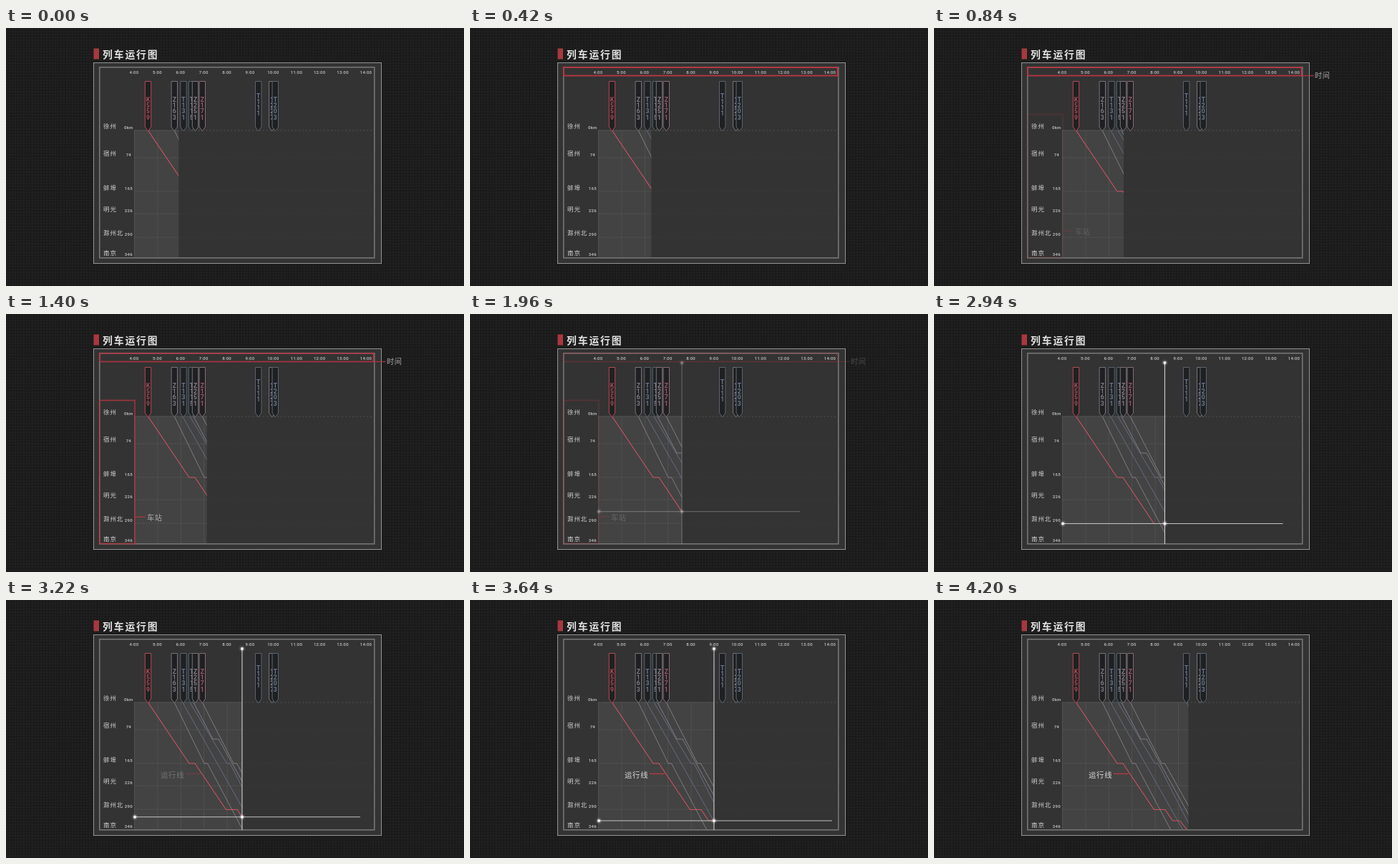
Animation of 640x360 px, one loop 4.34 s. Source, as an HTML page with a canvas:

```html
<!DOCTYPE html>
<html lang="zh-CN">
<head>
<meta charset="utf-8">
<title>列车运行图</title>
<style>
html, body { margin: 0; width: 100%; height: 100%; overflow: hidden; background: #1c1c1c; }
canvas { display: block; }
</style>
</head>
<body>
<canvas id="stage" width="640" height="360"></canvas>
<script>
const ctx = document.getElementById('stage').getContext('2d');
const LOOP = 4340, STEP = 140;
const CJK = '"Noto Sans CJK SC", "Noto Sans CJK", sans-serif';
const LATIN = 'Roboto, sans-serif';
const LEFT = 179, TOP = 143, BOTTOM = 321, HOUR = 32.4;
const RED = '#bb3541', GRAY = '#85828a', BLUE = '#68708c';

// name, distance in km, label centre y, distance centre y
const stations = [
  ['徐州', '0km', 136.5, 139.3], ['宿州', '74', 175, 176.5], ['蚌埠', '165', 222.5, 223.7],
  ['明光', '226', 253, 254.8], ['滁州北', '290', 286, 288], ['南京', '346', 314, 315.5]
];

// label, flag x, outline, text colour, path as x,y pairs
const trains = [
  ['K559', 198.5, '#b84a57', '#a84a58', [198.5, 143, 256, 228, 264, 228, 307.5, 292.5, 323, 292.5, 333.5, 308, 343.5, 308, 354, 321]],
  ['Z163', 235.3, '#77747a', '#807b86', [235.3, 143, 277, 228, 281.5, 228, 331, 321]],
  ['T131', 248, '#59636f', '#6c7894', [246.8, 143, 348, 321]],
  ['T115', 259.5, '#59636f', '#7e8494', [257, 143, 308.5, 228, 313, 228, 360, 320]],
  ['Z251', 264.5, '#77747a', '#8b7b88', [262, 143, 289, 194, 297, 194, 360, 307]],
  ['Z171', 274.3, '#8a6a72', '#a0586a', [274.3, 143, 318, 228, 322.5, 228, 360, 295]],
  ['T111', 352.7, '#59636f', '#6c7894', [352.7, 143, 400, 227]],
  ['1227', 371.8, '#77747a', '#8a8a92', []],
  ['T203', 376.3, '#59636f', '#6c7894', []]
];

const clamp = v => Math.max(0, Math.min(1, v));
const fade = (t, start, end) => clamp((t - start) / (end - start));
const sweepX = t => 241.3 + 0.02863 * t - 3.43e-7 * t * t;

function text(str, x, y, size, color, { font = CJK, weight = 400, align = 'left', gap = 0 } = {}) {
  ctx.font = `${weight} ${size}px ${font}`;
  ctx.letterSpacing = gap + 'px';
  ctx.textAlign = align;
  ctx.textBaseline = 'alphabetic';
  ctx.fillStyle = color;
  ctx.fillText(str, x, y + size * (font === CJK ? 0.38 : 0.355));
}

function line(points, color, width = 1, dash = []) {
  ctx.beginPath();
  for (let i = 0; i < points.length; i += 2) ctx.lineTo(points[i], points[i + 1]);
  ctx.strokeStyle = color;
  ctx.lineWidth = width;
  ctx.setLineDash(dash);
  ctx.stroke();
  ctx.setLineDash([]);
}

function box(x, y, w, h, color, width) {
  ctx.strokeStyle = color;
  ctx.lineWidth = width;
  ctx.strokeRect(x, y, w, h);
}

function pathY(points, x) {
  for (let i = 2; i < points.length; i += 2) {
    const [x0, y0, x1, y1] = points.slice(i - 2, i + 2);
    if (x <= x1) return y0 + (y1 - y0) * (x - x0) / (x1 - x0);
  }
  return BOTTOM;
}

function withAlpha(alpha, draw) {
  if (alpha <= 0) return;
  ctx.save();
  ctx.globalAlpha = alpha;
  draw();
  ctx.restore();
}

const texture = (() => {
  const tile = document.createElement('canvas');
  tile.width = tile.height = 4;
  const c = tile.getContext('2d');
  c.fillStyle = '#1b1b1b';
  c.fillRect(0, 0, 4, 4);
  c.fillStyle = '#222';
  c.fillRect(0, 0, 2, 2);
  return ctx.createPattern(tile, 'repeat');
})();

function drawFrame() {
  ctx.fillStyle = texture;
  ctx.fillRect(0, 0, 640, 360);
  ctx.fillStyle = '#a83840';
  ctx.fillRect(122.5, 28.5, 7.5, 15);
  text('列车运行图', 135, 36.3, 13.8, '#e2e2e2', { weight: 700, gap: 1.9 });
  ctx.fillStyle = '#333';
  ctx.fillRect(122, 48, 403, 281);
  box(122.5, 48.5, 402, 280, '#929292', 1);
  box(130.75, 54.75, 384, 266, '#757575', 1.6);
}

function drawGrid(front) {
  const rowY = km => TOP + parseInt(km) * 0.514;
  stations.forEach(([, km], i) => {
    if (i < 5) line([LEFT, rowY(km), 514, rowY(km)], i ? '#3b3b3b' : '#505050', 1, [2, 3]);
  });
  ctx.fillStyle = '#434343';
  ctx.fillRect(LEFT, TOP, front - LEFT, BOTTOM - TOP - 1);
  for (let x = LEFT + 0.5; x < front; x += HOUR) line([x, TOP, x, BOTTOM - 1], '#505050');
  stations.forEach(([, km], i) => {
    if (i < 5) line([LEFT, rowY(km), front, rowY(km)], '#535353', 1, i ? [3, 1] : []);
  });
}

function drawTrains(front) {
  ctx.save();
  ctx.beginPath();
  ctx.rect(LEFT, TOP, front - LEFT, BOTTOM - TOP);
  ctx.clip();
  for (const [name, , , , path] of [...trains].reverse()) {
    const kind = name[0];
    line(path, kind === 'K' ? '#cc5360' : kind === 'Z' ? GRAY : BLUE, kind === 'K' ? 1.1 : 0.9);
  }
  ctx.restore();
}

function drawFlags() {
  for (const [name, x, outline, color] of trains) {
    ctx.fillStyle = '#1f2022';
    ctx.beginPath();
    [[-4.2, 74.5], [4.2, 74.5], [4.2, 138], [0, 143.8], [-4.2, 138]]
      .forEach(([dx, y]) => ctx.lineTo(x + dx, y));
    ctx.closePath();
    ctx.fill();
    ctx.strokeStyle = outline;
    ctx.lineWidth = 1;
    ctx.stroke();
    const top = name === 'T111' ? 94.5 : 100;
    [...name].forEach((char, i) =>
      text(char, x, top + i * 8.2, 8.6, color, { font: LATIN, weight: 700, align: 'center' }));
  }
}

function drawLabels() {
  for (let h = 4; h <= 14; h++)
    text(h + ':00', LEFT + (h - 4) * HOUR, 62.3, 6, '#c4c4c4', { font: LATIN, weight: 500, align: 'center', gap: 0.25 });
  for (const [name, km, y, kmY] of stations) {
    text(name, 136, y, 8.5, '#d2d2d2', { weight: 500, gap: 0.9 });
    text(km, 171.3, kmY, 6.1, '#c4c4c4', { font: LATIN, weight: 500, align: 'center', gap: 0.2 });
  }
}

function drawCallouts(t) {
  const out = 1 - fade(t, 1680, 2100);
  const dim = 1 - 0.2 * fade(t, 700, 1260);
  withAlpha(fade(t, 0, 280) * out * dim, () => box(131, 55, 382.5, 11.5, RED, 1.8));
  withAlpha(fade(t, 420, 840) * out * 0.8, () => {
    line([513, 66.5, 531, 66.5], RED, 1.4);
    text('时间', 532, 66.2, 10.2, '#c8c8c8', { weight: 500, gap: 0.6 });
  });
  withAlpha(fade(t, 700, 1260) * out * 0.8, () => {
    box(131, 120.5, 49, 200, RED, 1.6);
    line([180, 283.2, 195, 283.2], RED, 1.4);
    text('车站', 197, 284, 10.2, '#c8c8c8', { weight: 500, gap: 0.6 });
  });
  withAlpha(fade(t, 3080, 3500), () => {
    line([251, 242.5, 272, 242.5], RED, 1.4);
    text('运行线', 216, 243.8, 10.4, '#dcdcdc', { weight: 500, gap: 0.7 });
  });
}

function glow(x, y) {
  const g = ctx.createRadialGradient(x, y, 0, x, y, 5);
  g.addColorStop(0, '#fff');
  g.addColorStop(0.35, '#ffffffcc');
  g.addColorStop(0.5, '#ffffff33');
  g.addColorStop(1, '#ffffff00');
  ctx.fillStyle = g;
  ctx.fillRect(x - 5, y - 5, 10, 10);
}

function drawCrosshair(t, x) {
  const y = pathY(trains[0][4], x);
  withAlpha(fade(t, 1820, 2240) * (1 - fade(t, 3780, 4060)), () => {
    line([x, 68, x, BOTTOM], '#d0d0d0', 1.1);
    line([180, y, x + 165, y], '#c4c4c4', 1.1);
    glow(x, 68);
    glow(180, y);
    glow(x, y);
  });
}

function render(now) {
  const t = Math.floor(now % LOOP / STEP) * STEP;
  const front = sweepX(t);
  drawFrame();
  drawGrid(front);
  drawTrains(front);
  drawFlags();
  drawLabels();
  drawCallouts(t);
  drawCrosshair(t, front);
}

function tick() {
  render(performance.now());
  requestAnimationFrame(tick);
}
tick();
</script>
</body>
</html>
```
